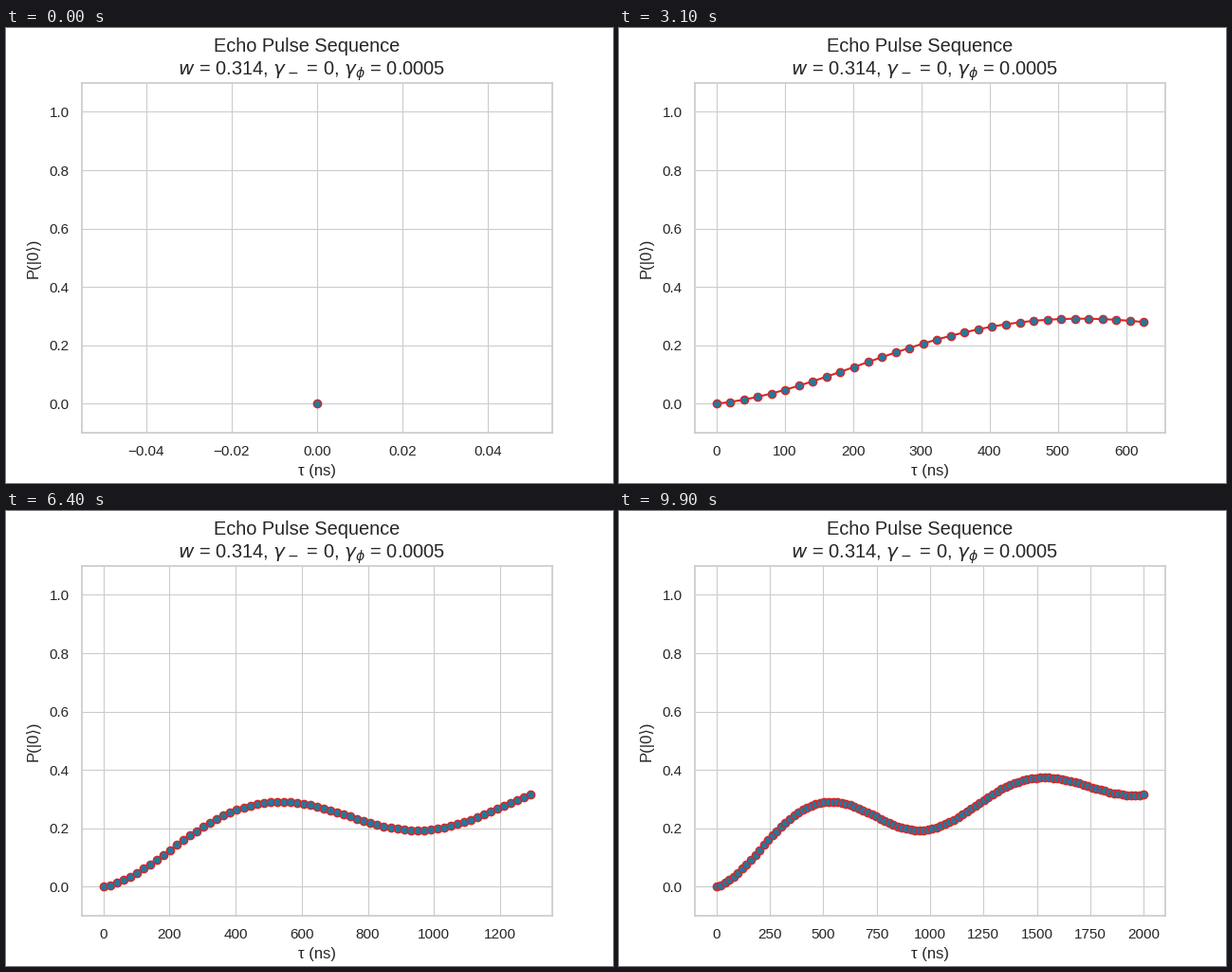
Recreate the animation shown at these times as a matplotlib script. Size 640 px wide and 480 px high, loop 10000 ms.

```python
import matplotlib.pyplot as plt
import numpy as np
from matplotlib.animation import FuncAnimation

FRAMES = 100
INTERVAL = 100
GAMMA_PHI = 0.0005  # dephasing rate, 1/ns
PERIOD = 1000       # revival of the echo, ns

INK, GRID = ".15", ".8"
plt.rcParams.update({
    "font.family": ["Liberation Sans", "DejaVu Sans"],
    "font.size": 12,
    "text.color": INK,
    "axes.labelcolor": INK,
    "axes.labelsize": 12,
    "axes.edgecolor": GRID,
    "axes.linewidth": 1.25,
    "axes.axisbelow": True,
    "axes.grid": True,
    "grid.color": GRID,
    "grid.linewidth": 0.8,
    "lines.solid_capstyle": "round",
})
for axis in ("xtick", "ytick"):
    plt.rcParams.update({
        f"{axis}.color": INK,
        f"{axis}.labelsize": 11,
        f"{axis}.major.size": 6,
    })
plt.rcParams.update({"xtick.bottom": False, "ytick.left": False})


def population(t):
    """Echo signal: a periodic coherence under exponential dephasing."""
    phase = 2 * np.pi * t / PERIOD
    coherence = 0.764 + 0.23 * np.cos(phase) + 0.006 * np.cos(2 * phase)
    return (1 - coherence * np.exp(-GAMMA_PHI * t)) / 2


tau = np.linspace(0, 2000, FRAMES)
prob = population(tau)

fig, ax = plt.subplots(figsize=(6.4, 4.8), dpi=100)
fig.suptitle("Echo Pulse Sequence \n $w$ = 0.314, "
             r"$\gamma_-$ = 0, $\gamma_\phi$ = 0.0005", linespacing=1.3)
ax.set_xlabel("τ (ns)")
ax.set_ylabel("P(|0⟩)", labelpad=6.8)
ax.set_ylim(-0.1, 1.1)
line, = ax.plot([], [], "o-", color="tab:red", lw=1.5, ms=6,
                markerfacecolor="#24789d")


def update(n):
    line.set_data(tau[:n + 1], prob[:n + 1])
    ax.relim()
    ax.autoscale_view(scaley=False)
    return line,


anim = FuncAnimation(fig, update, frames=FRAMES, interval=INTERVAL,
                     repeat=True, repeat_delay=0)
plt.show()
```
